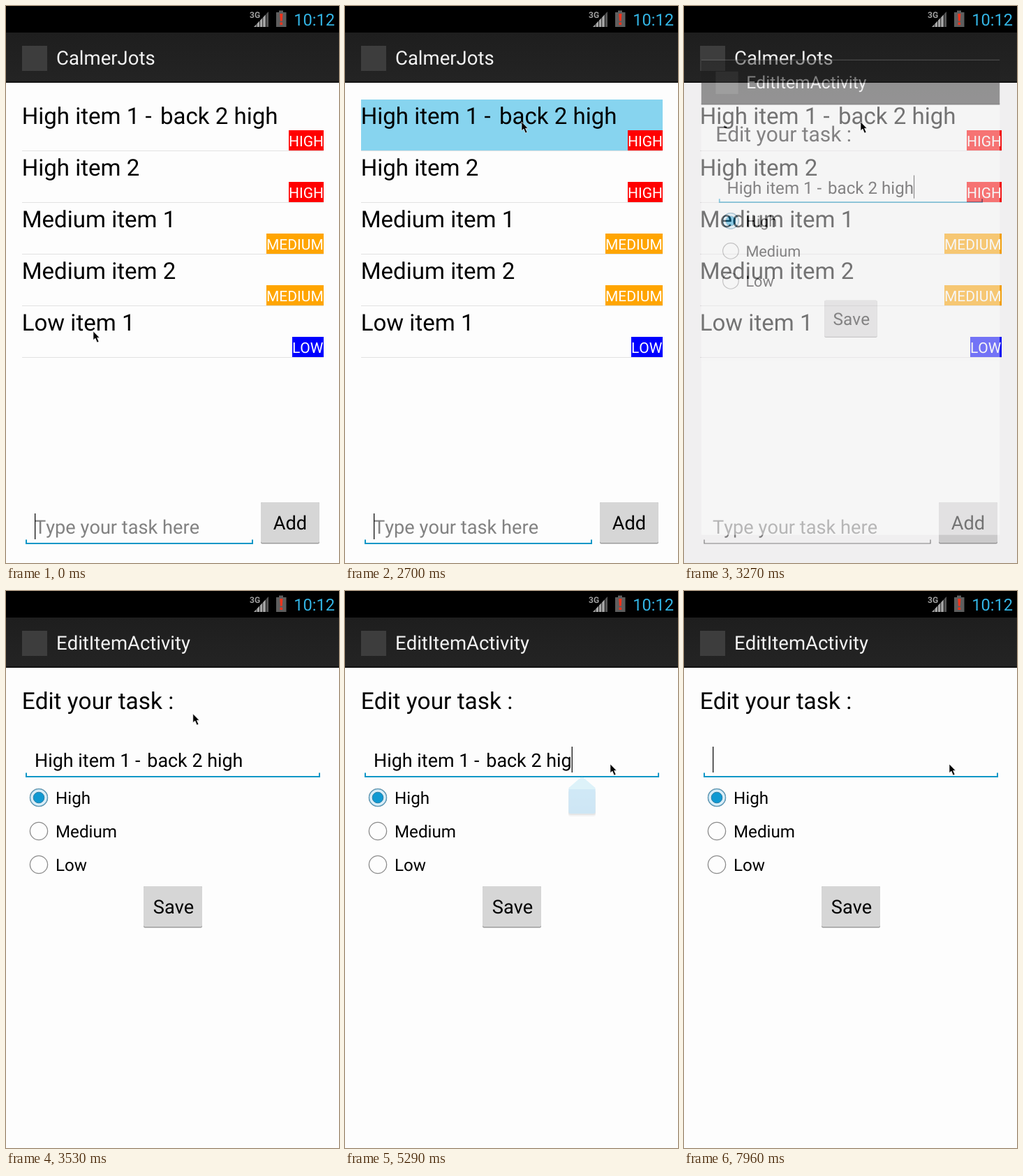
These frames come from a looping animation (477x798 px, 8 s). An HTML page:

```html
<!DOCTYPE html>
<html lang="en">
<head>
<meta charset="utf-8">
<title>Todo list</title>
<style>
  html, body { margin: 0; width: 100%; height: 100%; overflow: hidden; background: #fdfdfd; }
  svg { display: block; width: 477px; height: 798px; }
  text {
    font-family: Roboto, "Noto Sans", sans-serif; font-kerning: none;
    white-space: pre; text-rendering: geometricPrecision;
  }
  .large { font-size: 33.05px; }
  .heading { font-size: 33.4px; }
  .medium { font-size: 27.2px; }
  .label { font-size: 24.2px; }
  .tag { font-size: 21px; fill: #fff; }
  .title { font-size: 27.5px; fill: #f3f3f3; }
  .dash { letter-spacing: .12em; }
  .mid { text-anchor: middle; }
  .line { fill: none; stroke: #0f97c7; stroke-width: 2; }
  .caret { fill: #111; }
  .ring { fill: #fdfdfd; stroke: #8c8c8c; stroke-width: 1.3; }
  #field { font-size: 26.9px; }
  #edit { transform-origin: 238.5px 411px; }
</style>
</head>
<body>
<svg viewBox="0 0 477 798">
  <defs>
    <linearGradient id="barFill" x2="0" y2="1">
      <stop stop-color="#1e1e1e"/><stop offset="1" stop-color="#242424"/>
    </linearGradient>
    <linearGradient id="bodyFill" x2="0" y2="1">
      <stop stop-color="#2a9fdf"/><stop offset="1" stop-color="#1f90d6"/>
    </linearGradient>
    <clipPath id="wedge"><path d="M355 30L376 8V30Z"/></clipPath>
    <g id="bar">
      <rect y="38" width="477" height="72" fill="url(#barFill)"/>
      <rect y="108" width="477" height="2" fill="#131313"/>
      <rect x="23" y="57" width="36" height="36" fill="#3d3d3d"/>
    </g>
    <g id="button">
      <rect width="84" height="59.5" rx="2" fill="#9b9b9b"/>
      <rect width="84" height="58" rx="2" fill="#d6d6d6"/>
    </g>
  </defs>

  <g id="list">
    <rect width="477" height="798" fill="#fdfdfd"/>
    <rect id="press" x="23" y="134" width="432" height="73" fill="#87d4ef"/>
    <g id="rows"></g>
    <text class="medium" x="41" y="756" fill="#828282">Type your task here</text>
    <path id="listLine" class="line" d="M29 764.5V770H353V764.5"/>
    <rect id="listCaret" class="caret" x="41" y="727" width="1.3" height="37"/>
    <use href="#button" x="365" y="711"/>
    <text class="medium mid" x="407" y="750">Add</text>
    <rect id="dim" width="477" height="798" fill="#201020" opacity=".06"/>
    <use href="#bar"/>
    <text class="title" x="72" y="84">CalmerJots</text>
  </g>

  <g id="edit">
    <rect y="110" width="477" height="688" fill="#fdfdfd"/>
    <use href="#bar"/>
    <rect id="edge" y="38" width="477" height="1.2" fill="#8a8a8a"/>
    <text class="title" x="72" y="84">EditItemActivity</text>
    <text class="heading" x="22.7" y="169">Edit your task :</text>
    <text id="field" x="41" y="252"></text>
    <rect id="editCaret" class="caret" y="223" width="1.3" height="37"/>
    <path class="line" d="M29 260.5V266H449V260.5"/>
    <g id="radios"></g>
    <use href="#button" x="197" y="423"/>
    <text class="medium mid" x="240" y="462">Save</text>
    <g id="handle">
      <rect x="320" y="286" width="39" height="37" rx="3" fill="#000" opacity=".18"/>
      <rect x="320" y="286" width="39" height="35" rx="3" fill="#000" opacity=".3"/>
      <path d="M339.5 265.5L358.5 282V285H320.5V282Z" fill="#66cbee"/>
      <path d="M320.3 284H358.7V316Q358.7 319 355.7 319H323.3Q320.3 319 320.3 316Z" fill="url(#bodyFill)"/>
    </g>
  </g>

  <rect width="477" height="38"/>
  <text x="349" y="17" font-size="12" font-weight="700" fill="#a0a0a0">3G</text>
  <g id="signal" clip-path="url(#wedge)"></g>
  <path d="M391 6.5H397V9H401.5V30H387V9H391Z" fill="#5e5e5e"/>
  <path d="M392.2 11H396.4L395.7 21.5H392.9ZM392.5 23.5H396.1V27H392.5Z" fill="#f0331c"/>
  <text x="412.3" y="28" font-size="23.6" fill="#33b5e5">10:12</text>

  <path id="mouse" d="M0 0V12.5L3 10L5.5 16L8 15L5.5 9.3H9Z" stroke="#fff" stroke-width=".6"/>
</svg>

<script>
const $ = id => document.getElementById(id);
const LOOP = 8000;
const TASK = "High item 1 - back 2 high";
const markDash = s => s.replace("-", '<tspan class="dash">-</tspan>');

const tags = {
  HIGH: ["#f00", 405],
  MEDIUM: ["#ffa500", 373],
  LOW: ["#00f", 410]
};
const items = [
  [TASK, "HIGH"], ["High item 2", "HIGH"],
  ["Medium item 1", "MEDIUM"], ["Medium item 2", "MEDIUM"],
  ["Low item 1", "LOW"]
];

$("rows").innerHTML = items.map(([name, tag], i) => {
  const [color, x] = tags[tag];
  return `<g transform="translate(0 ${74 * i})">
    <text class="large" x="22.7" y="169">${markDash(name)}</text>
    <rect x="${x}" y="178" width="${455 - x}" height="29" fill="${color}"/>
    <text class="tag" x="${x}" y="201">${tag}</text>
    <rect x="23" y="207" width="432" height="1" fill="#e2e2e2"/></g>`;
}).join("");

$("radios").innerHTML = ["High", "Medium", "Low"].map((name, i) => {
  const y = 296 + 48 * i;
  const dot = i ? "" :
    `<circle cx="47" cy="${y}" r="12.4" fill="#d9edf7" stroke="#5a9cbd" stroke-width="1.3"/>
     <circle cx="47" cy="${y}" r="7.8" fill="#0f99d2" stroke="#2b7fa6"/>`;
  return `<circle class="ring" cx="47" cy="${y}" r="12.6"/>${dot}
    <text class="label" x="71" y="${y + 9}">${name}</text>`;
}).join("");

$("signal").innerHTML = [0, 1, 2, 3, 4].map(i =>
  `<rect x="${355 + 4.4 * i}" y="8" width="3.6" height="22" fill="${i < 4 ? "#a8a8a8" : "#555"}"/>`
).join("");

// time, x, y of the pointer tip
const path = [
  [0, 125, 466], [20, 125, 466], [820, 216, 176], [1000, 296, 156],
  [1210, 291, 163], [1640, 245, 166], [1680, 253, 166], [3450, 253, 166],
  [4100, 372, 246], [4430, 372, 246], [4550, 380, 248], [LOOP, 380, 248]
];

// time, scale, opacity of the opening screen
const opening = [
  [3100, .85, .1], [3270, .896, .45], [3450, .96, .8],
  [3490, .985, .93], [3530, 1, 1]
];

const slowDeletes = [6570, 6720, 6910, 7030, 7200, 7350, 7530, 7660, 7830, 7960];

const clamp = v => Math.max(0, Math.min(1, v));
const ramp = (t, from, to) => clamp((t - from) / (to - from));
const blinkOn = (t, start) => Math.floor((t - start) / 500) % 2 === 0;
const show = (id, on) => $(id).style.visibility = on ? "visible" : "hidden";

function pointer(t) {
  const i = path.findIndex(k => k[0] > t);
  const [a, b] = [path[i - 1], path[i]];
  const u = ramp(t, a[0], b[0]);
  return [1, 2].map(n => a[n] + (b[n] - a[n]) * u);
}

function charsLeft(t) {
  if (t < 5180) return TASK.length;
  if (t < 5660) return TASK.length - 1;
  const fast = Math.max(10, 23 - Math.floor((t - 5660) / 55));
  return fast - slowDeletes.filter(d => t >= d).length;
}

function draw(t) {
  const [x, y] = pointer(t);
  $("mouse").setAttribute("transform", `translate(${x} ${y})`);

  const focused = t < 2840;
  show("press", t >= 2540 && focused);
  show("listCaret", t < 20 || (focused && !blinkOn(t, 20)));
  $("listLine").style.stroke = focused ? "#0f97c7" : "#858585";
  $("listLine").style.strokeWidth = focused ? 2 : 1.2;
  show("dim", t >= 3270);

  const stage = opening.filter(k => t >= k[0]).pop();
  const [, scale, alpha] = stage || [0, 1, 0];
  $("edit").style.transform = `scale(${scale})`;
  $("edit").style.opacity = alpha;
  $("list").style.display = alpha < 1 ? "" : "none";
  show("edge", alpha < 1);

  const field = $("field");
  const typed = TASK.slice(0, charsLeft(t));
  field.innerHTML = markDash(typed);
  $("editCaret").setAttribute("x", 41 + (typed ? field.getComputedTextLength() : 0));
  show("editCaret", t >= 5180 || (t >= 2800 && blinkOn(t, 2800)));
  $("handle").style.opacity = ramp(t, 4310, 4400) * (1 - ramp(t, 5180, 5320));
}

const start = performance.now();
function tick() {
  draw((performance.now() - start) % LOOP);
  requestAnimationFrame(tick);
}
draw(0);
requestAnimationFrame(tick);
</script>
</body>
</html>
```
